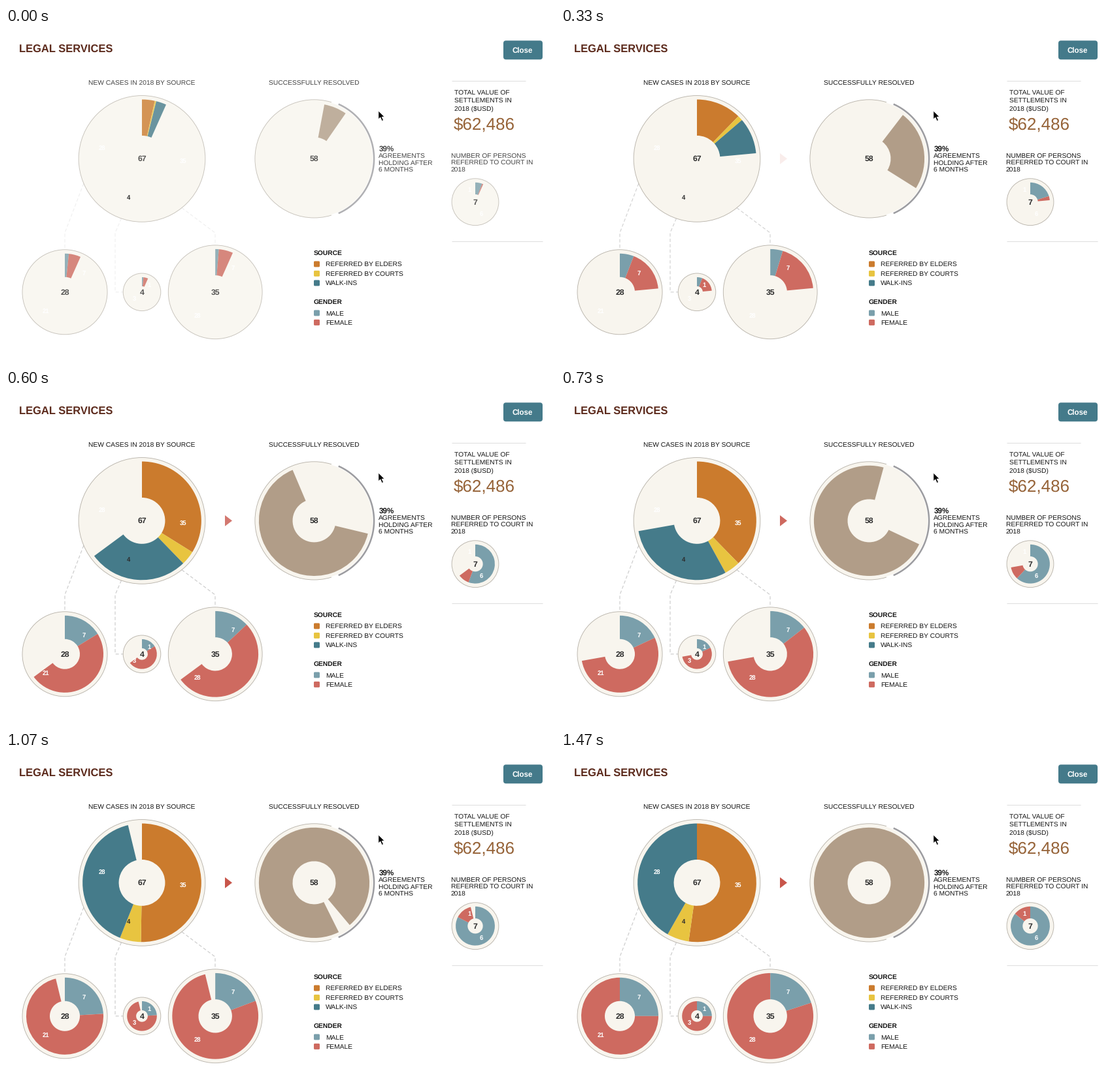
Write a matplotlib script that moves like this. It is 840 by 512 pixels and loops after 1540 ms.

```python
import numpy as np
import matplotlib.pyplot as plt
from matplotlib.animation import FuncAnimation
from matplotlib.patches import Circle, FancyBboxPatch, Polygon, Wedge

W, H, DPI = 840, 512, 80
PT = 72 / DPI  # points per pixel
FRAMES, INTERVAL = 77, 20
HOLE = 0.39    # inner radius of a ring relative to its outer radius

ORANGE, YELLOW, TEAL = "#cb7b2d", "#e8c440", "#457b8a"
MALE, FEMALE, TAN = "#7a9fab", "#ce6a60", "#b19d88"
CREAM, RIM, RULE, INK = "#f8f5ee", "#b9b4ab", "#dddddd", "#151515"

plt.rcParams["font.family"] = "Liberation Sans"
plt.rcParams["text.hinting"] = "none"
fig = plt.figure(figsize=(W / DPI, H / DPI), dpi=DPI, facecolor="white")
ax = fig.add_axes([0, 0, 1, 1])
ax.set_xlim(0, W)
ax.set_ylim(H, 0)
ax.axis("off")

fading, links, wedges = [], [], []


def polar(cx, cy, r, degrees):
    """Point at a clockwise angle from twelve o'clock."""
    a = np.radians(degrees)
    return cx + r * np.sin(a), cy - r * np.cos(a)


def text(x, y, s, size=10.25, color=INK, bold=False, ha="left"):
    """Text whose capitals are vertically centred on y."""
    return ax.text(x, y + 0.344 * size, s, fontsize=size * PT, color=color,
                   weight="bold" if bold else "normal", ha=ha,
                   va="baseline", zorder=6)


def paragraph(x, y, step, *rows):
    return [text(x, y + i * step, row) for i, row in enumerate(rows)]


def stroke(xs, ys, color, width, z=1, **kw):
    return ax.plot(xs, ys, color=color, lw=width * PT, zorder=z, snap=False,
                   **kw)[0]


def arc(cx, cy, r, start, end, color, width):
    xs, ys = polar(cx, cy, r, np.linspace(start, end, 120))
    return stroke(xs, ys, color, width, 3, solid_capstyle="butt")


def box(x, y, w, h, r, color):
    ax.add_patch(FancyBboxPatch((x + r, y + r), w - 2 * r, h - 2 * r,
                                boxstyle=f"round,pad={r},rounding_size={r}",
                                fc=color, ec="none", snap=False))


def disc_radius(total):
    """Disc area follows the number of cases."""
    return 11 * total ** 0.5 + 6.8


def pie(cx, cy, slices, start=0):
    """Disc with a growing ring; slices are (value, colour)."""
    total = sum(value for value, _ in slices)
    radius = disc_radius(total)
    ring = radius - 6
    fading.append(ax.add_patch(Circle((cx, cy), radius, fc=CREAM, ec=RIM,
                                      lw=0.9 * PT, zorder=2)))
    fading.append(text(cx, cy - 0.3, str(total), 12.2, "#2d2d2d", True,
                       "center"))
    a = start
    for value, color in slices:
        b = a + 360 * value / total
        wedge = ax.add_patch(Wedge((cx, cy), ring, 0, 1,
                                   width=(1 - HOLE) * ring,
                                   fc=color, ec="none", zorder=4))
        wedges.append((wedge, a, b))
        fading.append(wedge)
        if len(slices) > 1:
            x, y = polar(cx, cy, ring * (1 + HOLE) / 2, (a + b) / 2)
            text(x, y, str(value), 9.5,
                 "#2d2d2d" if color == YELLOW else "white", True, "center")
        a = b


# Header
text(20, 32, "LEGAL SERVICES", 16.5, "#5c2a1c", True)
box(761, 19.3, 60, 29, 4, "#447a8a")
text(790.5, 34.3, "Close", 11.5, "white", True, "center")

# Charts
top, low = 200.4, 404.8
pie(208, top, [(35, ORANGE), (4, YELLOW), (28, TEAL)])
pie(471.5, top, [(58, TAN)], start=159.6)
pie(718, 266.7, [(6, MALE), (1, FEMALE)])
for cx, male, female in [(90, 7, 21), (208, 1, 3), (320.2, 7, 28)]:
    pie(cx, low, [(male, MALE), (female, FEMALE)])

for cx, title in [(208, "NEW CASES IN 2018 BY SOURCE"),
                  (471.5, "SUCCESSFULLY RESOLVED")]:
    fading.append(text(cx, 83.9, title, ha="center"))

# Connectors leave the large disc and bend down to the small ones
for angle, path in [(247, [(90, 314), (90, low - disc_radius(28))]),
                    (199, [(167, 314), (167, low), (179, low)]),
                    (141, [(320, 314), (320, low - disc_radius(35))])]:
    xs, ys = zip(polar(208, top, disc_radius(67), angle), *path)
    links.append(stroke(xs, ys, "#c9c9c9", 1.1, dashes=(4.5, 3)))

# Share of agreements that hold
arc(471.5, top, 91, 17, 163, "white", 3)
fading.append(arc(471.5, top, 91.6, 24, 156, "#9c9ca0", 2.5))
fading.append(text(570.3, 184.7, "39%", 11.6, INK, True))
fading += paragraph(570.3, 196.3, 10.6,
                    "AGREEMENTS", "HOLDING AFTER", "6 MONTHS")
arrow = ax.add_patch(Polygon([(335, top - 8.4), (346, top), (335, top + 8.4)],
                             fc="#c8564b", ec="none"))

# Side column
stroke((683, 795), (81.5, 81.5), RULE, 1)
stroke((683, 821), (327.5, 327.5), RULE, 1)
paragraph(685.5, 99, 12, "TOTAL VALUE OF", "SETTLEMENTS IN", "2018 ($USD)")
text(685, 146.7, "$62,486", 26, "#966338")
fading += paragraph(680.7, 196.1, 10.4,
                    "NUMBER OF PERSONS", "REFERRED TO COURT IN", "2018")

# Legend
for y, heading, items in [
        (345.7, "SOURCE", [("REFERRED BY ELDERS", ORANGE),
                           ("REFERRED BY COURTS", YELLOW),
                           ("WALK-INS", TEAL)]),
        (420.7, "GENDER", [("MALE", MALE), ("FEMALE", FEMALE)])]:
    text(471, y, heading, 10.3, INK, True)
    for i, (name, color) in enumerate(items):
        row = y + 16.7 + 14.5 * i
        box(471, row - 5, 9, 9, 1.5, color)
        text(489, row, name, 10.3)

# Mouse pointer
pointer = [(0, 0), (0, 13.2), (3, 10.4), (5.4, 15.8), (7.8, 14.7),
           (5.4, 9.6), (9.4, 9.4)]
ax.add_patch(Polygon(np.add(pointer, (569.8, 126.8)), fc="black", ec="white",
                     lw=0.9 * PT, zorder=9))


def ease(t, begin, duration):
    """Cubic in and out, from 0 to 1."""
    u = min(max((t - begin) / duration, 0), 1)
    return 4 * u ** 3 if u < 0.5 else 1 - 4 * (1 - u) ** 3


def update(i):
    # The picture advances 15 times a second.
    t = (2 * i + 1) * 3 // 20 * 200 / 3
    grow = ease(t, -511, 2000)
    for wedge, a, b in wedges:
        wedge.set_theta1(a * grow - 90)
        wedge.set_theta2(b * grow - 90)
    for artist in fading:
        artist.set_alpha(ease(t, -630, 1000))
    for link in links:
        link.set_alpha(ease(t, -420, 1000))
    arrow.set_alpha(ease(t, -30, 1000))
    return []


anim = FuncAnimation(fig, update, frames=FRAMES, interval=INTERVAL,
                     repeat=True, repeat_delay=0, blit=False)
plt.show()
```
